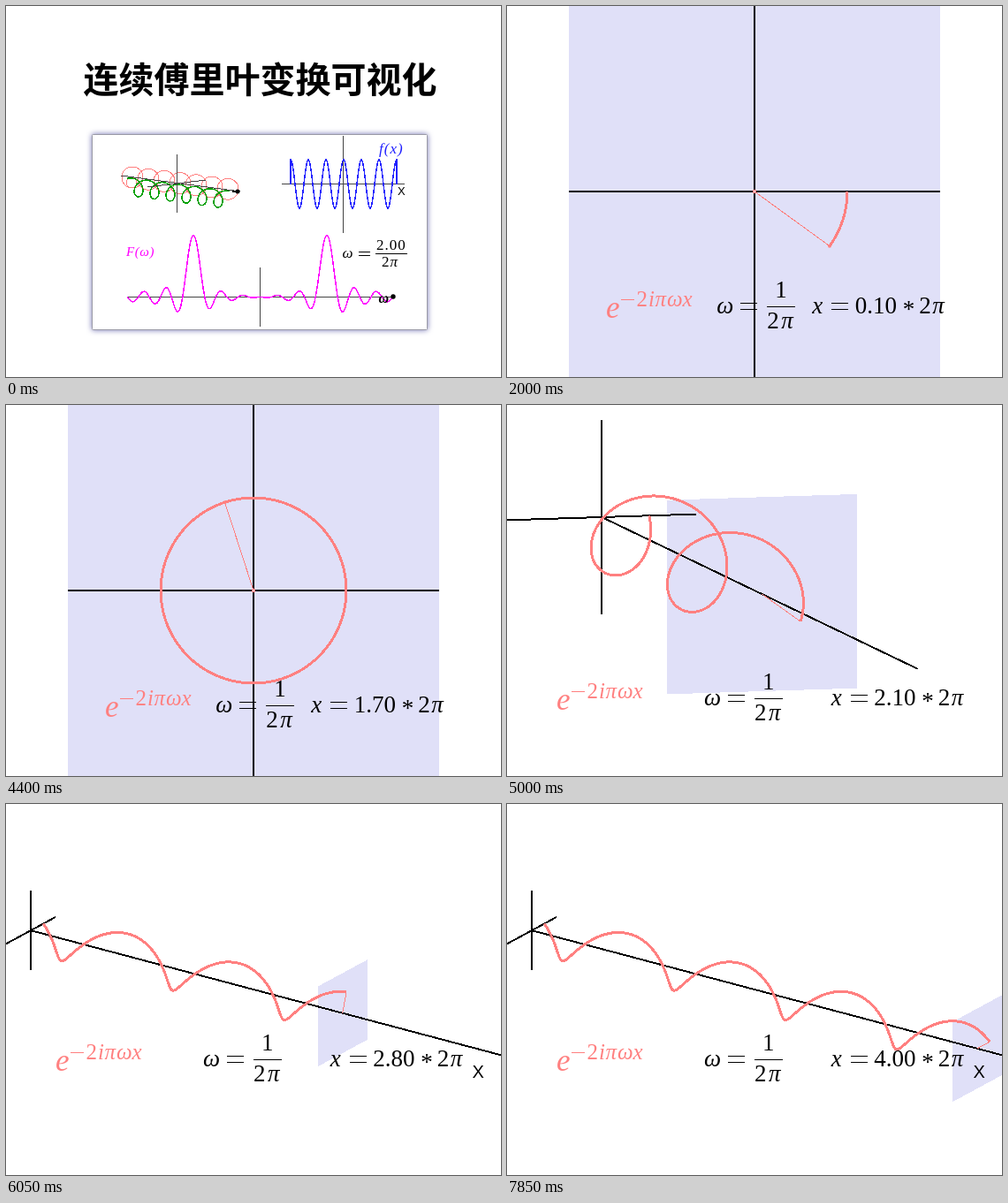
These frames come from a looping animation (560 by 420 pixels, 8 s). An HTML page:

```html
<!DOCTYPE html>
<html lang="zh-CN">
<head>
<meta charset="utf-8">
<title>连续傅里叶变换可视化</title>
<style>
html, body { margin: 0; width: 100%; height: 100%; overflow: hidden; background: #fff; }
svg { display: block; width: 560px; height: 420px; }
path, line { fill: none; shape-rendering: crispEdges; }
.cjk { font: bold 40px "Noto Sans CJK SC", "Noto Sans CJK", sans-serif; }
.lat { font: bold 41px "Open Sans", "Noto Sans", sans-serif; }
.sans { font-family: "Liberation Sans", sans-serif; }
.m { font-family: "Liberation Serif", serif; font-size: 27px; }
.m i, .it { font-style: italic; }
.card { fill: #fff; stroke: #9a9aa6; filter: drop-shadow(0 0 3px #7474b4); }
.axis { stroke: #000; stroke-width: 2; }
.thin { stroke: #444; stroke-width: 1; }
.pink { stroke: #ff8080; }
.off { display: none; }
</style>
</head>
<body>
<svg viewBox="0 0 560 420" xmlns="http://www.w3.org/2000/svg">
  <g id="cover">
    <text class="cjk" x="87.5" y="98">连续傅里叶变换可视化</text>
    <rect class="card" x="97.5" y="145.5" width="379" height="221" rx="1"/>
    <path id="rings" stroke="#ff8080"/>
    <path id="loops" stroke="#00a000" stroke-width="1.5"/>
    <path class="thin" d="M193.5 168V234M130 192L265 210M160 205L226 197"/>
    <path d="M256 210H262" stroke="#000" stroke-width="2"/>
    <circle cx="262" cy="210" r="2.5"/>

    <path class="thin" d="M312 201.5H451M381.5 147V257"/>
    <path id="wave" stroke="#2020ff" stroke-width="1.5"/>
    <text class="m it" x="422" y="167" fill="#2020ff" style="font-size:17px" letter-spacing="1">f(x)</text>
    <text class="sans" x="443" y="213.5" font-size="13">X</text>

    <path class="thin" d="M137 329.5H438M287.5 296V363"/>
    <path id="spectrum" stroke="#ff00ff" stroke-width="1.5"/>
    <circle cx="438" cy="329" r="2.7"/>
    <text class="m it" x="421.5" y="336" style="font-size:16px;font-weight:bold">ω</text>
    <text class="m it" x="136" y="283" fill="#ff00ff" style="font-size:15px" letter-spacing=".6">F(ω)</text>
    <g class="m" style="font-size:17px">
      <text class="it" x="380.5" y="285">ω</text>
      <path d="M399 278.5H412M399 282.5H412M418 280.5H454" stroke="#000"/>
      <text x="419" y="276" letter-spacing="1">2.00</text>
      <text x="425" y="295">2<tspan class="it" dx="1">π</tspan></text>
    </g>
  </g>

  <g id="scene">
    <path id="plane" style="fill:#e0e0f8"/>
    <path id="axes" class="axis"/>
    <path id="helix" class="pink" stroke-width="3" stroke-linejoin="round"/>
    <path id="radius" class="pink" stroke-width="1"/>
    <g id="dots" fill="#ff8080">
      <circle id="hub" r="2.2"/><circle id="tip" r="2"/>
      <circle id="core" r="1" fill="#ffe4e4"/>
    </g>
  </g>

  <g id="intro">
    <line x1="280" y1="210" x2="385" y2="210" stroke="#ff4444" stroke-width="2"/>
    <circle cx="280" cy="210" r="2.3" fill="#ff8080"/>
    <circle cx="280" cy="210" r="1" fill="#ffe4e4"/>
    <circle cx="385" cy="210" r="2.2" fill="#ff8080"/>
    <text class="cjk" x="330.5" y="70">复平面</text>
    <text class="lat" x="249" y="105">i</text>
    <text class="lat" x="140" y="251">-1</text>
    <text class="lat" x="372.5" y="250">1</text>
    <text class="lat" x="286" y="341">-i</text>
  </g>

  <g id="labels" class="m">
    <g id="expo" fill="#ff8080">
      <text class="it" y="13" style="font-size:35px">e</text>
      <path class="pink" d="M17 -7.5H32" stroke-width="1.3"/>
      <g style="font-size:25px">
        <text x="34.5">2</text>
        <text class="it" x="48">i</text>
        <text class="it" x="55.5">π</text>
        <text class="it" x="69">ω</text>
        <text class="it" x="86.5">x</text>
      </g>
    </g>
    <g id="omega">
      <text class="it" y="8">ω</text>
      <path d="M27 -3.5H46M27 3.5H46M57 .5H89" stroke="#000" stroke-width="1.3"/>
      <text x="66" y="-10">1</text>
      <text x="57" y="25">2</text>
      <text class="it" x="73" y="25">π</text>
    </g>
    <g id="value">
      <text class="it" x="1" y="8">x</text>
      <path d="M23 -3.5H42M23 3.5H42" stroke="#000" stroke-width="1.3"/>
      <text id="num" x="49.5" y="8"></text>
      <text x="103.5" y="12">*</text>
      <text x="122" y="8">2</text>
      <text class="it" x="137" y="8">π</text>
    </g>
  </g>
  <text id="xName" class="sans" x="527.5" y="310" font-size="20">X</text>
</svg>
<script>
const TAU = 2 * Math.PI, LOOP = 8000;
const START = 500, SPIN = 2000, STEP = 150;
const $ = id => document.getElementById(id);
const show = (id, on) => $(id).classList.toggle('off', !on);
const setPath = (id, d) => $(id).setAttribute('d', d);
const poly = pts => 'M' + pts.map(p => p[0].toFixed(2) + ' ' + p[1].toFixed(2)).join('L');
const sample = (a, b, n, fn) =>
  Array.from({ length: n + 1 }, (_, i) => fn(a + (b - a) * i / n));

function drawCover() {
  const wave = sample(-3, 3, 240, n => [382 + 20 * n, 201.5 - 27.5 * Math.cos(TAU * n)]);
  setPath('wave', poly([[322, 201.5], ...wave, [442, 201.5]]));

  const sinc = v => Math.abs(v) < 1e-9 ? 1 : Math.sin(Math.PI * v) / (Math.PI * v);
  setPath('spectrum', poly(sample(-4, 4, 320, w =>
    [287.5 + 37.6 * w, 329.5 - 70 * (sinc(3 * (w - 2)) + sinc(3 * (w + 2)))])));

  const ring = (x, y, r) => `M${x - r} ${y}a${r} ${r} 0 1 0 ${2 * r} 0a${r} ${r} 0 1 0 ${-2 * r} 0`;
  setPath('rings', sample(0, 6, 6, n => ring(143 + 18 * n, 194 + 2.2 * n, 12)).join('') + ring(142, 200, 6));
  setPath('loops', poly(sample(-.55, 5.55, 260, n => {
    const a = TAU * n;
    return [150 + 18 * n - 9 * Math.sin(a), 206 + 2.4 * n + 10 * Math.cos(a)];
  })));
}

// Orthographic camera fitted around the box x 0..8π, y and z ±2.
function camera(u) {
  const vx = 1.6 - .2 * u, vy = 2 * u, vz = u;
  const az = Math.atan2(vy, vx), el = Math.atan2(vz, Math.hypot(vx, vy));
  const sa = Math.sin(az), ca = Math.cos(az), se = Math.sin(el), ce = Math.cos(el);
  const len = 4 * TAU;
  const w = len * sa + 4 * ca;
  const h = 4 * ce + (len * ca + 4 * sa) * se;
  const s = Math.min(560 / w, 420 / h);
  const left = 280 - s * w / 2, top = 210 - s * h / 2;
  const ox = left + 2 * s * ca, oy = top + 2 * s * (sa * se + ce);
  return {
    left, top, w: s * w, h: s * h,
    at: (x, y, z) => [ox + s * (x * sa + y * ca), oy + s * (x * se * ca - y * sa * se - z * ce)]
  };
}

function place(id, [x, y]) {
  $(id).setAttribute('transform', `translate(${x.toFixed(2)} ${y.toFixed(2)})`);
}

function drawScene(k) {
  const turns = k / 10, x = turns * TAU;
  const u = Math.min(1, Math.max(0, (k - 20) / 5));
  const cam = camera(u), at = cam.at;
  const axisEnd = u < 1 ? 26 : 27;

  setPath('plane', poly([at(x, -2, -2), at(x, 2, -2), at(x, 2, 2), at(x, -2, 2)]) + 'Z');
  setPath('axes', poly([at(0, -2, 0), at(0, 2, 0)]) + poly([at(0, 0, -2), at(0, 0, 2)]) +
    (u > 0 ? poly([at(0, 0, 0), at(axisEnd, 0, 0)]) : ''));

  const point = a => at(a, Math.cos(a), -Math.sin(a));
  const hub = at(x, 0, 0), tip = point(x);
  setPath('helix', k ? poly(sample(0, x, Math.max(2, k * 8), point)) : '');
  setPath('radius', k ? poly([hub, tip]) : '');
  place('hub', hub);
  place('core', hub);
  place('tip', tip);
  show('dots', k > 0 && u === 0);

  const y = cam.top + .81 * cam.h;
  place('expo', [cam.left + .1 * cam.w, y]);
  place('omega', [cam.left + .398 * cam.w, y]);
  place('value', [cam.left + .653 * cam.w, y]);
  $('num').textContent = turns.toFixed(2);
  show('xName', u === 1);
}

let last = null;
function frame() {
  const t = performance.now() % LOOP;
  const k = t < START ? -1 : t < SPIN ? 0 : Math.floor((t - SPIN) / STEP) + 1;
  if (k !== last) {
    last = k;
    show('cover', k < 0);
    show('scene', k >= 0);
    show('intro', k === 0);
    show('labels', k > 0);
    drawScene(Math.max(0, k));
  }
  requestAnimationFrame(frame);
}

drawCover();
frame();
</script>
</body>
</html>
```
